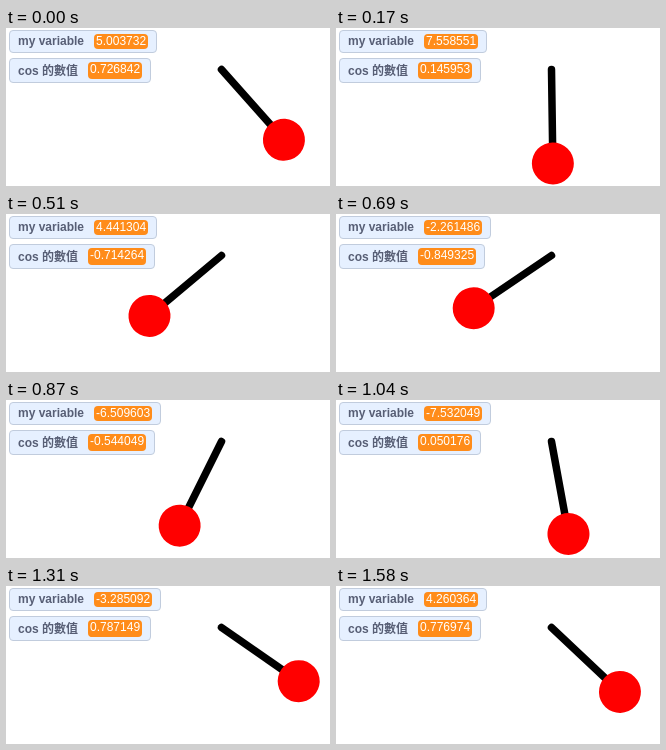
These frames come from a looping animation (324 by 158 pixels, 1670 ms). An HTML page:

```html
<!DOCTYPE html>
<html lang="zh-Hant">
<head>
<meta charset="utf-8">
<title>Pendulum</title>
<style>
  html, body { margin: 0; width: 100%; height: 100%; overflow: hidden; background: #fff; }
  svg { position: absolute; left: 0; top: 0; }
  .monitor {
    position: absolute; left: 3px; top: 2px; height: 23px; box-sizing: border-box;
    display: flex; align-items: flex-start; padding: 3px 8px 0;
    border: 1px solid #c1ccdd; border-radius: 4px; background: #e6f0ff;
    font: 12px/15px "Liberation Sans", "Noto Sans CJK TC", "Noto Sans CJK", sans-serif;
    white-space: nowrap;
  }
  .monitor b { margin-right: 10px; color: #575e75; }
  .monitor span { padding: 0 2px; border-radius: 4px; background: #ff8c1a; color: #fff; }
  .tall { top: 30px; height: 25px; }
  .tall b { line-height: 18px; }
  .tall span { padding-bottom: 2px; }
</style>
</head>
<body>
<svg width="324" height="158">
  <g id="pendulum">
    <path d="M0 0V94" stroke="#000" stroke-width="7.5" stroke-linecap="round"/>
    <circle cy="94" r="21" fill="#f00"/>
  </g>
</svg>
<div class="monitor"><b>my variable</b><span id="speed"></span></div>
<div class="monitor tall"><b>cos 的數值</b><span id="pull"></span></div>
<script>
const FRAMES = 19, STEPS_PER_FRAME = 2.75, LOOP = 1670;
const SHORT_FRAMES = [0, 3, 6, 10]; // 80 ms, all others 90 ms
const byId = id => document.getElementById(id);
const sin = degrees => Math.sin(degrees * Math.PI / 180);
const format = value => String(Number(value.toFixed(6)));

// Known state at step 11, rewound to the start of the loop.
let angle = Math.asin(-0.473336) * 180 / Math.PI;
let speed = 6.37223;
for (let i = 0; i < 11; i++) {
  speed -= sin(angle);
  angle += speed;
}

const states = [];
for (let i = 0; i <= FRAMES * STEPS_PER_FRAME; i++) {
  states.push({ speed, pull: sin(angle), tilt: angle - speed });
  angle -= speed;
  speed += sin(angle);
}

function frameAt(time) {
  let frame = 0;
  for (let end = 0; frame < FRAMES - 1; frame++) {
    end += SHORT_FRAMES.includes(frame) ? 80 : 90;
    if (time < end) break;
  }
  return frame;
}

function draw() {
  const frame = frameAt(performance.now() % LOOP);
  const state = states[Math.round(frame * STEPS_PER_FRAME)];
  byId('pendulum').setAttribute('transform', `translate(215.5 41.5) rotate(${-state.tilt})`);
  byId('speed').textContent = format(state.speed);
  byId('pull').textContent = format(state.pull);
  requestAnimationFrame(draw);
}
draw();
</script>
</body>
</html>
```
